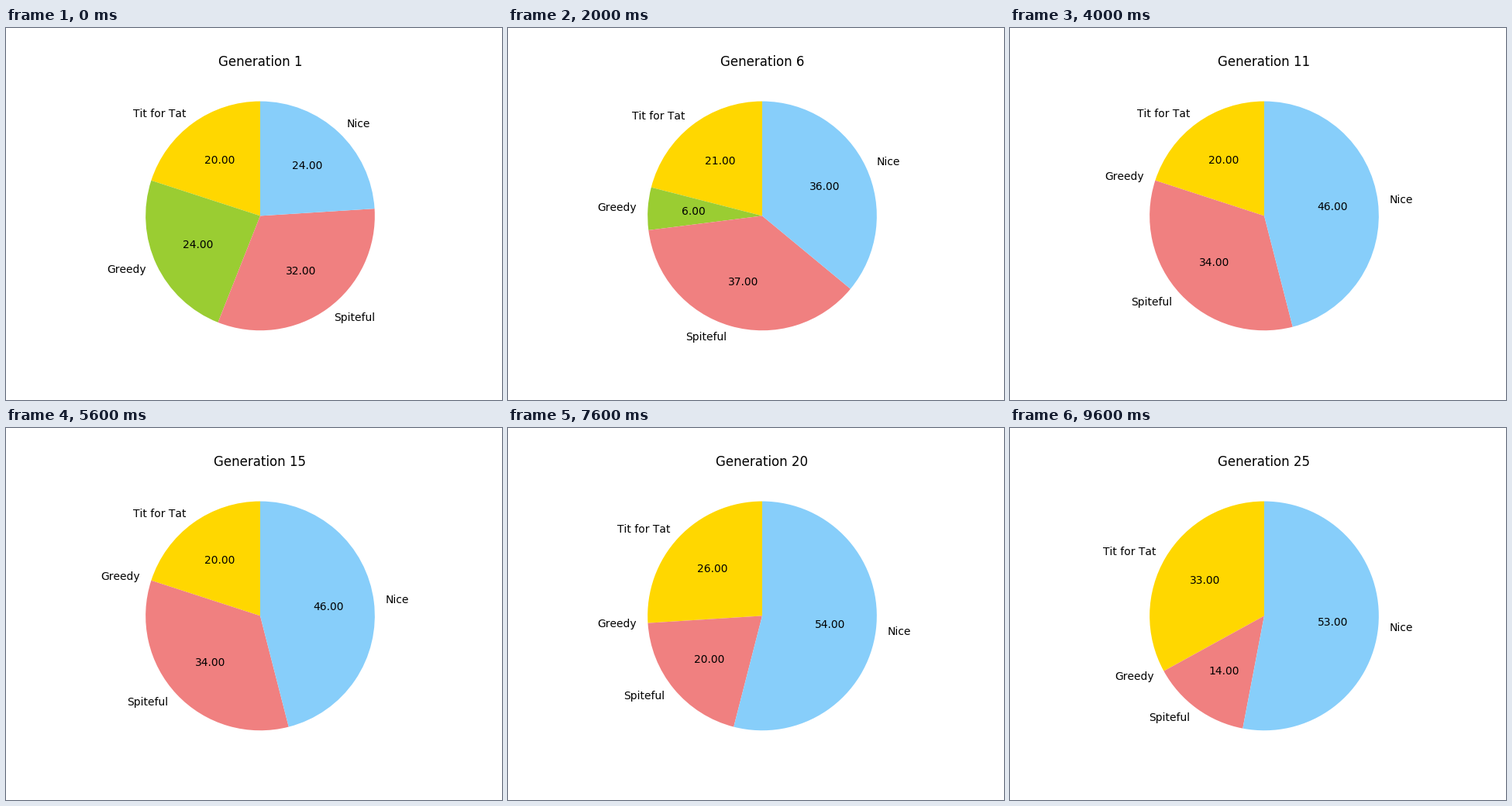
A matplotlib script for the animation above (10000 ms loop, 640 px wide and 480 px high).

```python
import matplotlib.pyplot as plt
import numpy as np
from matplotlib.animation import FuncAnimation

# Whole-pixel glyph advances, without fine kerning.
plt.rcParams["text.kerning_factor"] = 6

LABELS = ["Tit for Tat", "Greedy", "Spiteful", "Nice"]
COLORS = ["gold", "yellowgreen", "lightcoral", "lightskyblue"]
GENERATIONS = 25
POPULATION = 100

# Turning points of the run: generation -> (greedy, spiteful, nice).
KEYS = {
    1: (24, 32, 24),
    2: (26, 29, 20),
    3: (14, 31, 28),
    6: (6, 37, 36),
    8: (1, 44, 35),
    9: (1, 44, 30),
    11: (0, 34, 46),
    13: (0, 34, 49),
    15: (0, 34, 46),
    18: (0, 22, 58),
    20: (0, 20, 54),
    23: (0, 23, 47),
    25: (0, 14, 53),
}

fig, ax = plt.subplots(figsize=(6.4, 4.8), dpi=100)


def census(gen):
    """Head counts at a generation; Tit for Tat fills the remainder."""
    others = [np.rint(np.interp(gen, list(KEYS), counts))
              for counts in zip(*KEYS.values())]
    return [POPULATION - sum(others), *others]


def count_text(pct):
    return f"{pct:.2f}" if pct > 0 else ""


def draw(i):
    ax.clear()
    ax.pie(census(i + 1), labels=LABELS, colors=COLORS,
           autopct=count_text, startangle=90)
    ax.set_title(f"Generation {i + 1}")
    return ax.patches + ax.texts


anim = FuncAnimation(fig, draw, frames=GENERATIONS, init_func=lambda: draw(0),
                     interval=400, repeat=True, repeat_delay=0)
plt.show()
```
